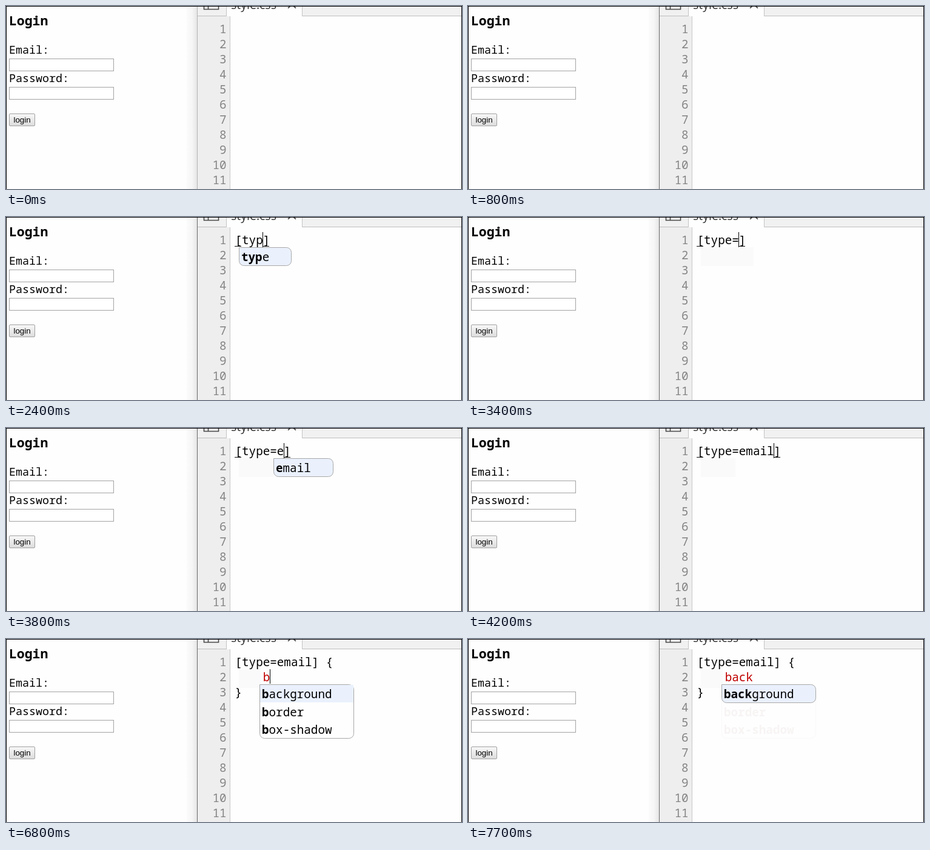
These frames come from a looping animation (752 px wide and 303 px high, 8 s). An HTML page:

```html
<!DOCTYPE html>
<html lang="en">
<head>
<meta charset="utf-8">
<title>Typing a CSS rule</title>
<style>
  html, body { margin: 0; width: 100%; height: 100%; overflow: hidden; background: #fefefe; }
  svg { display: block; }
  text { white-space: pre; }
  .mono { font-family: "Noto Sans Mono", monospace; }
  .page { font-size: 18.33px; }
  .code { font-size: 19.25px; }
  .num { fill: #858585; text-anchor: end; }
  .crisp { shape-rendering: crispEdges; }
  .field { fill: #fff; stroke: #a3a3a3; }
  .bold { font-weight: 700; }
  .red { fill: #c00000; }
  .faint { fill: #f8f4f4; }
</style>
</head>
<body>
<svg width="752" height="303" viewBox="0 0 752 303">
  <defs>
    <linearGradient id="shade">
      <stop offset="0" stop-color="#fbfbfb"/>
      <stop offset=".5" stop-color="#f6f6f6"/>
      <stop offset="1" stop-color="#e6e6e6"/>
    </linearGradient>
    <linearGradient id="btn" x2="0" y2="1">
      <stop offset="0" stop-color="#f8f8f8"/>
      <stop offset="1" stop-color="#dcdcdc"/>
    </linearGradient>
  </defs>

  <g class="mono page">
    <text class="bold" x="5" y="32" font-size="21.45">Login</text>
    <text x="5" y="79">Email:</text>
    <text x="5" y="126">Password:</text>
  </g>
  <g class="crisp">
    <rect class="field" x="5.5" y="87.5" width="172" height="20"/>
    <rect class="field" x="5.5" y="134.5" width="172" height="20"/>
    <rect x="298" y="1" width="17" height="302" fill="url(#shade)"/>
  </g>
  <rect x="5.5" y="178.5" width="42" height="20" rx="1.5" fill="url(#btn)" stroke="#a0a0a0"/>
  <text x="12.5" y="193" font-family="Liberation Sans, Arial, sans-serif" font-size="13.33">login</text>

  <g class="crisp">
    <rect x="316" y="17" width="53" height="286" fill="#eeeeee"/>
    <rect x="369" y="17" width="1" height="286" fill="#c8c8c8"/>
    <rect x="316" y="1" width="435" height="15" fill="#f1f1f1"/>
    <rect x="316" y="16" width="435" height="1" fill="#bdbdbd"/>
    <rect x="363" y="1" width="126" height="16" fill="#c4c4c4"/>
    <rect x="364" y="1" width="124" height="16" fill="#fefefe"/>
    <rect id="split" x="315" y="1" width="1" height="302"/>
  </g>
  <path d="M326.5 0V5.5H350.5V0M333.5 0V5" fill="none" stroke="#4a4a4a" stroke-width="1.6"/>
  <text x="371" y="4.5" font-family="Open Sans, sans-serif" font-size="19.5" fill="#333">style.css</text>
  <path d="M469 0l-4 3.5M474 0l4 3.5" stroke="#555" stroke-width="2"/>

  <g id="nums" class="mono code"></g>
  <g id="editor" class="mono code"></g>

  <path class="crisp" d="M0 .5H752M.5 0V303M751.5 0V303" stroke="#000"/>
</svg>
<script>
const LOOP = 8000, LEFT = 377.5, CHAR = 11.55, LINE = 25, BASE = 45;
const $ = id => document.getElementById(id);

// Popups: position, size and entries; typed prefixes are shown bold.
const type = { x: 384, y: 50, w: 87, items: ['type'] };
const email = { x: 441, y: 50, w: 99, items: ['email'] };
const all = { x: 418, y: 75, w: 156, items: ['background', 'border', 'box-shadow'] };
const back = { ...all, items: ['background'] };

// Steps: start time, code, caret column (-1 hides it), popup, typed length.
const rule = s => `[type=email] {\n    ${s}\n}`;
const steps = [
  [0, '', -1],
  [300, '', 0],
  [800, '', -1],
  [1300, '', 0],
  [1800, '[]', 1],
  [2200, '[t]', 2, type, 1],
  [2300, '[ty]', 3, type, 2],
  [2400, '[typ]', 4, type, 3],
  [2500, '[type]', 5],
  [3000, '[type]', -1],
  [3400, '[type=]', 6],
  [3800, '[type=e]', 7, email, 1],
  [3900, '[type=em]', 8, email, 2],
  [4000, '[type=ema]', 9, email, 3],
  [4200, '[type=email]', 11],
  [4600, '[type=email]', -1],
  [4900, '[type=email]', 12],
  [5400, '[type=email] ', 13],
  [5900, '[type=email] {}', 14],
  [6000, rule(''), 4],
  [6500, rule(''), -1],
  [6800, rule('b'), 5, all, 1],
  [6900, rule('ba'), 6, back, 2],
  [7100, rule('bac'), 7, back, 3],
  [7300, rule('back'), 8, back, 4],
  [7700, rule('back'), -1, back, 4]
];

const rect = (x, y, w, h, fill) =>
  `<rect class="crisp" x="${x}" y="${y}" width="${w}" height="${h}" fill="${fill}"/>`;
const text = (x, y, s, cls = '') => `<text class="${cls}" x="${x}" y="${y}">${s}</text>`;
const colX = col => Math.floor(LEFT + col * CHAR);

// Outline with a square top-left corner and three rounded ones.
function bubble(x, y, w, h, r, fill, stroke) {
  const a = (dx, dy) => `a${r} ${r} 0 0 1 ${dx} ${dy}`;
  return `<path d="M${x + .5} ${y + .5}h${w - 1 - r}${a(r, r)}v${h - 1 - 2 * r}${a(-r, r)}` +
    `h${2 * r + 1 - w}${a(-r, -r)}z" fill="${fill}" stroke="${stroke}"/>`;
}

function popup({ x, y, w, items }, typed) {
  const n = items.length, h = Math.round(29.5 * n + 1.5);
  let out = bubble(x, y, w, h, 8, n > 1 ? '#fefefe' : '#eaf1fd', '#a8a8a8');
  if (n > 1) out += rect(x + 1, y + 1, w - 2, 29, '#eaf1fd');
  items.forEach((s, i) => {
    const label = `<tspan class="bold">${s.slice(0, typed)}</tspan>${s.slice(typed)}`;
    out += text(x + 4, y + 23 + i * 29.5, label, 'hint');
  });
  return out;
}

// Faint traces left behind by closed popups.
function traces(t) {
  let out = '';
  if (t >= 2500) out += rect(384, 50, t < 3800 ? 87 : t < 6800 ? 57 : 36, 31, '#fafafa');
  if (t >= 6900) {
    out += bubble(418, 75, 156, 90, 8, 'none', '#f8f8f8') +
      text(422, 127.5, 'border', 'faint bold') + text(422, 157, 'box-shadow', 'faint bold');
  }
  return out;
}

function draw([t, code, col, hint, typed]) {
  const lines = code.split('\n'), row = lines.length > 1 ? 1 : 0;
  let out = traces(t);
  lines.forEach((s, i) => {
    out += text(LEFT, BASE + i * LINE, s, i === 1 ? 'red' : '');
  });
  const pair = row ? null : /[[{][^[{]*[\]}]$/.exec(code);
  if (pair) {
    for (const c of [pair.index, code.length - 1]) out += rect(colX(c), 48, 11, 1, '#111');
  }
  if (hint) out += popup(hint, typed);
  if (col >= 0) out += rect(colX(col), LINE * (row + 1), 1, row ? 24 : 25, '#000');
  $('editor').innerHTML = out;
}

$('nums').innerHTML = Array.from({ length: 11 }, (_, i) =>
  text(363.5, BASE + i * LINE, i + 1, 'num')).join('');

let shown;
function tick() {
  const t = performance.now() % LOOP;
  const step = steps.findLast(s => s[0] <= t);
  if (step !== shown) draw(shown = step);
  $('split').setAttribute('fill', t < 300 ? '#b4b4b4' : t < 400 ? '#8c8c8c' : '#6a6a6a');
  requestAnimationFrame(tick);
}
tick();
</script>
</body>
</html>
```
